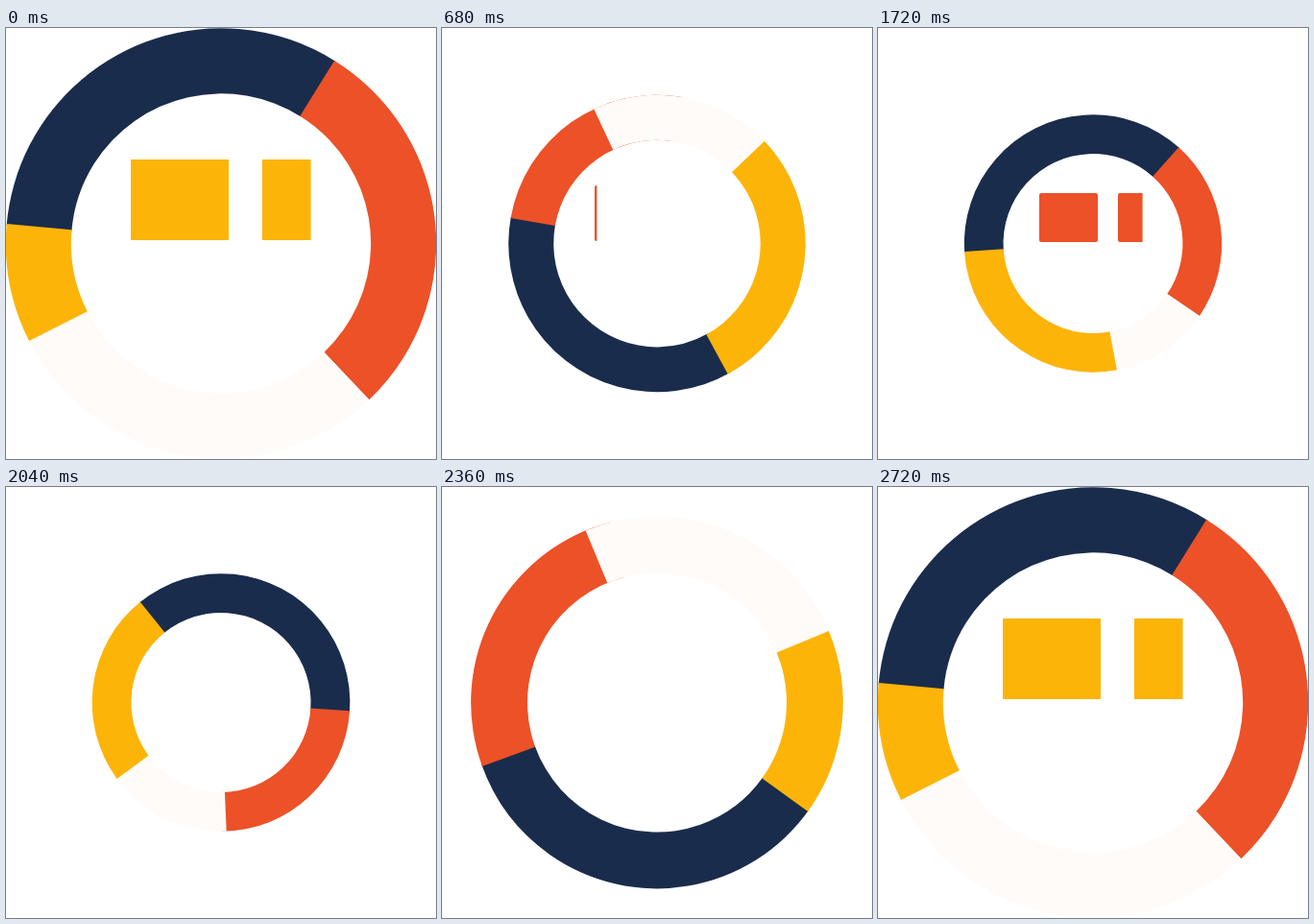
These frames come from a looping animation (448 px wide and 449 px high, 2760 ms). An HTML page with a canvas:

```html
<!DOCTYPE html>
<html lang="en">
<head>
<meta charset="utf-8">
<title>Ring chart</title>
<style>
html, body { margin: 0; width: 100%; height: 100%; overflow: hidden; background: #fff; }
canvas { display: block; }
</style>
</head>
<body>
<canvas id="stage" width="448" height="449"></canvas>
<script>
const ctx = document.getElementById('stage').getContext('2d');
const LOOP = 2760, STEP = 40, CX = 224, CY = 224.5;
const SMALL = 134.2, BIG = 224.2, HOLE = 0.6965;
const NAVY = '#1a2c4c', ORANGE = '#ec5128', CREAM = '#fffbf8', YELLOW = '#fdb409';

const mix = (a, b, p) => a + (b - a) * p;
const span = (t, from, to) => Math.min(1, Math.max(0, (t - from) / (to - from)));
const smooth = x => x * x * (3 - 2 * x);

// Ease curve with control points (x1, 0) and (x2, 1).
function ease(x, x1, x2) {
  if (x <= 0 || x >= 1) return x;
  let lo = 0, hi = 1;
  for (let i = 0; i < 30; i++) {
    const s = (lo + hi) / 2, r = 1 - s;
    if (3 * r * r * s * x1 + 3 * r * s * s * x2 + s * s * s < x) lo = s;
    else hi = s;
  }
  return smooth(lo);
}

// Slice edges in degrees: orange start, cream start, yellow start, navy start.
const wide = [-58.2, 46.5, 153.1, 185.25];
const tight = [-48.3, 34.2, 79.3, 176.4];

function shrinkPose(t) {
  const x = span(t, 167, 1000);
  const at = (i, p) => mix(wide[i], tight[i] + 360, p);
  const lead = smooth(x), lag = ease(x, 0.34, 0.83);
  return {
    radius: mix(BIG, SMALL, smooth(span(t, 332, 836))),
    orange: [at(0, lead), at(1, lead)],
    cream: [at(1, lag), at(2, lag)],
    yellow: [at(2, lag), at(3, ease(x, 0.29, 0.69))],
    navy: [at(3, lead), at(0, lead) + 360]
  };
}

function growPose(t) {
  const x = span(t, 1820, 2720);
  const at = (i, p) => mix(tight[i], wide[i] + 360, p);
  const lead = ease(x, 0.3, 0.78);
  return {
    radius: mix(SMALL, BIG, ease(span(t, 2030, 2630), 0.22, 0.6)),
    orange: [at(0, lead), at(1, lead)],
    cream: [at(1, ease(x, 0.3, 0.82)), at(2, lead)],
    yellow: [at(2, lead), at(3, lead)],
    navy: [at(3, lead), at(0, lead) + 360]
  };
}

function slice(radius, [from, to], color, before = 0, after = 0) {
  const a = (from - before) * Math.PI / 180, b = (to + after) * Math.PI / 180;
  ctx.beginPath();
  ctx.arc(CX, CY, radius, a, b);
  ctx.arc(CX, CY, radius * HOLE, b, a, true);
  ctx.closePath();
  ctx.fillStyle = color;
  ctx.fill();
}

// Two label blocks, revealed from the left.
function blocks(scale, shown, color, corner) {
  if (shown <= 0) return;
  const px = v => Math.round(CX + v * scale);
  const top = CY - 52.2 * scale, bottom = CY - 2 * scale;
  const edge = CX + mix(-56, 56, shown) * scale;
  ctx.save();
  ctx.beginPath();
  ctx.rect(0, 0, edge, 449);
  ctx.clip();
  ctx.fillStyle = color;
  for (const [l, r] of [[-56, 5], [26, 56]]) {
    ctx.beginPath();
    ctx.roundRect(px(l), Math.round(top), px(r) - px(l), Math.round(bottom) - Math.round(top), corner);
    ctx.fill();
  }
  ctx.restore();
}

function draw(t) {
  const pose = t < 1360 ? shrinkPose(t) : growPose(t);
  const r = pose.radius, scale = r / SMALL;
  ctx.fillStyle = '#fff';
  ctx.fillRect(0, 0, 448, 449);

  slice(r, pose.navy, NAVY, 0.5, 0.5);
  slice(r, pose.orange, ORANGE);
  slice(r, pose.cream, CREAM, 0, 0.5);
  slice(r, pose.yellow, YELLOW);

  const yellow = t < 1360 ? 1 - smooth(span(t, 0, 335)) : smooth(span(t, 2365, 2720));
  const orange = t < 1360 ? smooth(span(t, 655, 1000)) : 1 - smooth(span(t, 1680, 2015));
  blocks(scale, yellow, YELLOW, 0);
  blocks(scale, orange, ORANGE, 2);
}

const begin = performance.now();
function tick() {
  const t = (performance.now() - begin) % LOOP;
  draw(Math.floor(t / STEP + 0.001) * STEP);
  requestAnimationFrame(tick);
}
tick();
</script>
</body>
</html>
```
